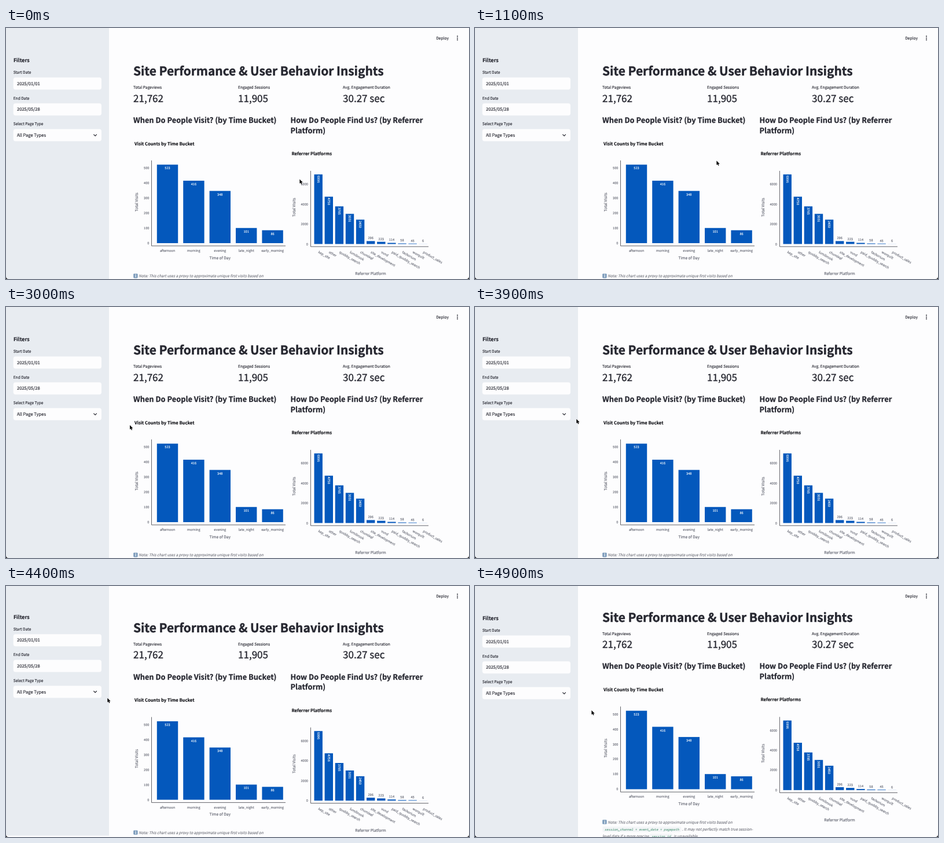
These frames come from a looping animation (800x434 px, 5000 ms). An HTML page:

```html
<!DOCTYPE html>
<html lang="en">
<head>
<meta charset="utf-8">
<title>Site Performance</title>
<style>
  html, body { margin: 0; width: 100%; height: 100%; overflow: hidden; background: #fdfdfe; }
  svg { display: block; width: 100vw; height: 100vh; }
  text {
    font-family: "Noto Sans CJK SC", "Noto Sans CJK JP", "Noto Sans", sans-serif;
    text-rendering: geometricPrecision;
    stroke-width: .02em;
    white-space: pre;
  }
  .code { font-family: "Noto Sans Mono", "DejaVu Sans Mono", monospace; }
</style>
</head>
<body>
<svg id="stage" viewBox="0 0 800 434" xmlns="http://www.w3.org/2000/svg"></svg>
<script>
const LOOP = 5000, STEP = 100;
const INK = '#262730', BLACK = '#101116', TICK = '#5f626e', BLUE = '#0458bc', NOTE = '#74767f';
const SMALL = 5.68, LABEL = 6.63, BODY = 7.58;

const esc = s => s.replace(/&/g, '&amp;');

function text(x, y, str, size, o = {}) {
  const turn = o.turn ? ` transform="rotate(${o.turn} ${x} ${y})"` : '';
  const fill = o.fill || INK;
  return `<text x="${x}" y="${y}" font-size="${size}" fill="${fill}" stroke="${fill}"` +
    ` font-weight="${o.weight || 400}" text-anchor="${o.anchor || 'start'}"` +
    (o.italic ? ' font-style="italic"' : '') +
    (o.code ? ' class="code"' : '') + `${turn}>${esc(str)}</text>`;
}

function rect(x, y, w, h, fill, r = 0) {
  return `<rect x="${x}" y="${y}" width="${w}" height="${h}" rx="${r}" fill="${fill}"/>`;
}

function axes(x, top, bottom, right) {
  return `<path d="M${x} ${top}V${bottom}H${right}" fill="none" stroke="#3c3d45" stroke-width=".8"/>`;
}

function ticks(x, base, step, values) {
  return values.map((v, i) =>
    text(x, base - i * step + 2, String(v), SMALL, { fill: TICK, anchor: 'end' })).join('');
}

function axisTitle(x, y, str, turn) {
  return text(x, y, str, LABEL, { fill: TICK, anchor: 'middle', turn });
}

function sidebar() {
  const field = (label, value, y) =>
    text(12.7, y, label, LABEL) +
    rect(12.7, y + 6.5, 152.3, 21, '#fdfdfe', 4) +
    text(19, y + 19.7, value, BODY);
  return rect(0, 0, 178, 434, '#e8ecf1') +
    text(12.9, 59.3, 'Filters', 8.95, { weight: 600 }) +
    field('Start Date', '2025/01/01', 79.1) +
    field('End Date', '2025/05/28', 123.7) +
    field('Select Page Type', 'All Page Types', 168.3) +
    `<path d="M151.4 183.9l2.7 2.7 2.7-2.7" fill="none" stroke="${INK}" stroke-width="1.2"/>`;
}

function timeChart() {
  const base = 372, unit = 0.2595;
  const data = [['afternoon', 523], ['morning', 416], ['evening', 348], ['late_night', 101], ['early_morning', 86]];
  const bars = data.map(([name, n], i) => {
    const x = 279 + i * 45.4, h = n * unit;
    return rect(x - 18.2, base - h, 36.4, h, BLUE) +
      text(x, base - h + 8.1, String(n), SMALL, { fill: '#fff', anchor: 'middle' }) +
      text(x, 387.1, name, SMALL, { fill: TICK, anchor: 'middle' });
  }).join('');
  return text(222, 202.8, 'Visit Counts by Time Bucket', 7.6, { weight: 700, fill: BLACK }) +
    ticks(247.5, base, 100 * unit, [0, 100, 200, 300, 400, 500]) + bars +
    axes(251.5, 229, 376.8, 483) +
    axisTitle(227.8, 301, 'Total Visits', -90) +
    axisTitle(369.7, 399.9, 'Time of Day');
}

function referrerChart() {
  const base = 373.5, unit = 0.0172;
  const data = [
    ['kep_site', 6996], ['other', 4758], ['quobby_search', 3785], ['lumibrook', 3031],
    ['chumleaf', 2450], ['site_development', 296], ['vund', 223], ['paid_quobby_search', 114],
    ['tackorium', 58], ['worquilt', 45], ['product_sales', 6]
  ];
  const bars = data.map(([name, n], i) => {
    const x = 539.7 + i * 18.1, h = n * unit, top = base - h;
    const count = n > 2000
      ? text(x - 2, top + 1.8, String(n), SMALL, { fill: '#fff', turn: 90 })
      : text(x, top - 3.1, String(n), SMALL, { fill: TICK, anchor: 'middle' });
    return rect(x - 7.2, top, 14.4, h, BLUE) + count +
      text(x - 0.6, 388.8, name, SMALL, { fill: TICK, turn: 30 });
  }).join('');
  return text(493.5, 220, 'Referrer Platforms', 7.6, { weight: 700, fill: BLACK }) +
    ticks(522, base, 2000 * unit, [0, 2000, 4000, 6000]) + bars +
    axes(526.4, 247, 378, 730) +
    axisTitle(499.6, 310, 'Total Visits', -90) +
    axisTitle(630, 427.3, 'Referrer Platform');
}

function note() {
  const line = (x, y, s) => text(x, y, s, 6.49, { fill: NOTE, italic: true });
  const code = (x, y, w, s) => rect(x, y - 7, w, 9.4, '#f3f5f7', 2) +
    text(x + 3.4, y - .4, s, 5.5, { fill: '#5a9c80', italic: true, code: true });
  return rect(220.2, 424.8, 7.4, 7.6, '#7d9cbc', 1.4) +
    text(223.9, 431.2, 'i', 6.6, { fill: '#fff', weight: 700, anchor: 'middle' }) +
    line(229.3, 431.3, 'Note: This chart uses a proxy to approximate unique first visits based on') +
    code(220.4, 443.6, 136, 'session_channel + event_date + pagepath') +
    line(357.6, 443.6, '. It may not perfectly match true session-') +
    line(220, 455.8, 'level data if a more precise') +
    code(301.6, 455.8, 39.8, 'session_id') +
    line(343, 455.8, 'is unavailable.');
}

function mainPage() {
  const metric = (x, label, value) => text(x, 105.2, label, LABEL) + text(x, 127.8, value, 17.05);
  const head = (x, y, s) => text(x, y, s, 12.8, { weight: 600 });
  return text(220, 82.3, 'Site Performance & User Behavior Insights', 20.87, { weight: 700 }) +
    metric(220, 'Total Pageviews', '21,762') +
    metric(401, 'Engaged Sessions', '11,905') +
    metric(582, 'Avg. Engagement Duration', '30.27 sec') +
    head(220, 164, 'When Do People Visit? (by Time Bucket)') +
    head(491.5, 164, 'How Do People Find Us? (by Referrer') +
    head(491.5, 181.8, 'Platform)') +
    timeChart() + referrerChart() + note();
}

function toolbar() {
  const dots = [14.2, 17.4, 20.6].map(y => `<circle cx="780" cy="${y}" r="1" fill="${INK}"/>`).join('');
  return text(743.2, 19.8, 'Deploy', LABEL) + dots;
}

const corners = '<path d="M0 429.5Q0 434 4.5 434H0zM800 429.5Q800 434 795.5 434H800z" fill="#000"/>';
const arrow = '<path d="M0 0V7.5L1.7 5.9L2.9 8.6L4.2 8L3 5.4H5.4Z" fill="#000" stroke="#fff" stroke-width=".7" paint-order="stroke"/>';

const stage = document.getElementById('stage');
stage.innerHTML = rect(0, 0, 800, 434, '#fdfdfe') +
  `<g id="main">${mainPage()}</g><g id="side">${sidebar()}</g>` +
  toolbar() + `<g id="cursor">${arrow}</g>` + corners;
const [mainEl, sideEl, cursorEl] = ['main', 'side', 'cursor'].map(id => document.getElementById(id));

// Keys: time, then values
const pointer = [
  [0, 507.4, 261.6], [200, 504, 261], [500, 504, 261], [1100, 417.4, 229.5],
  [2100, 270.4, 219.6], [3700, 175.3, 193.8], [4400, 175.3, 193.8], [4700, 201.4, 215]
];
const bounce = [[3900, 0], [4200, -3.4], [4400, -2.4], [4700, 0]];
const scroll = [[4700, 0], [4800, -8], [4900, -20.6]];

function at(keys, t) {
  if (t <= keys[0][0]) return keys[0].slice(1);
  for (let i = 1; i < keys.length; i++) {
    const a = keys[i - 1], b = keys[i];
    if (t <= b[0]) {
      const u = (t - a[0]) / (b[0] - a[0]), e = u * u * (3 - 2 * u);
      return a.slice(1).map((v, k) => v + (b[k + 1] - v) * e);
    }
  }
  return keys[keys.length - 1].slice(1);
}

const move = (el, x, y) => el.setAttribute('transform', `translate(${x} ${y})`);

function draw(ms) {
  const t = Math.floor((ms % LOOP) / STEP) * STEP;
  const [lift] = at(bounce, t), [up] = at(scroll, t);
  move(sideEl, 0, lift);
  move(mainEl, 0, lift + up);
  move(cursorEl, ...at(pointer, t));
}

const start = performance.now();
function tick() {
  draw(performance.now() - start);
  requestAnimationFrame(tick);
}
tick();
</script>
</body>
</html>
```
